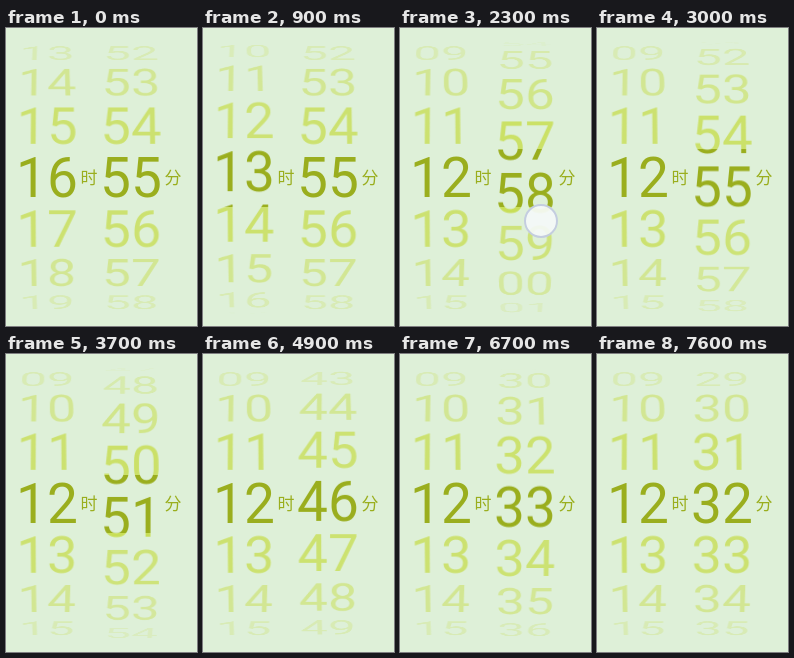
Write an HTML page that moves like this. It is 191 px wide and 298 px high and loops after 8 s.

```html
<!DOCTYPE html>
<html lang="zh-CN">
<head>
<meta charset="utf-8">
<title>时间选择</title>
<style>
  :root { --bg: #def0d8; --ink: #9aae1e; --pale: #c6dd4d; --mid: 150.2px; }
  html, body { margin: 0; width: 100%; height: 100%; overflow: hidden; background: var(--bg); }
  #stage { position: relative; width: 191px; height: 298px; overflow: hidden; background: var(--bg); }
  .wheel { position: absolute; top: 0; width: 68px; height: 298px; }
  .band { position: absolute; left: 0; top: 121px; width: 100%; height: 58px; overflow: hidden; background: var(--bg); }
  .layer { position: absolute; left: 0; top: 0; width: 100%; height: 298px; color: var(--pale); }
  .band .layer { top: -121px; color: var(--ink); }
  .item {
    position: absolute; left: 0; top: calc(var(--mid) - 32px); width: 100%; height: 64px;
    font: 400 55px/64px Roboto, sans-serif; text-align: center; white-space: nowrap;
  }
  .unit {
    position: absolute; top: 136.5px; width: 24px; height: 24px; color: var(--ink);
    font: 400 17px/24px "Noto Sans CJK SC", "Noto Sans CJK", sans-serif; text-align: center;
  }
  #touch {
    position: absolute; left: -17px; top: -17px; width: 34px; height: 34px; box-sizing: border-box;
    border: 2px solid rgba(184, 194, 218, .8); border-radius: 50%; background: rgba(246, 249, 250, .9);
  }
</style>
</head>
<body>
<div id="stage">
  <div class="unit" style="left:71px">时</div>
  <div class="unit" style="left:155px">分</div>
  <div id="touch"></div>
</div>
<script>
const LOOP = 8000, STEP = 100;
const RADIUS = 135, DEPTH = 675, ANGLE = Math.PI / 8, REACH = 4;
const stage = document.getElementById('stage');
const touch = document.getElementById('touch');

const lin = u => u;
const out = u => 1 - (1 - u) * (1 - u);

// [time, value, easing towards it]
const hourKeys = [
  [500, 16], [800, 13.4, lin], [1400, 12.45, out], [1600, 12, out]
];
const minuteKeys = [
  [1400, 55], [1700, 57.3, lin], [1900, 58, out],
  [2200, 58, lin], [2300, 57.7, lin], [2500, 56.2, lin], [3200, 54.7, out],
  [3400, 51.45, lin], [4000, 50.5, out], [4200, 50, out],
  [4600, 50, lin], [4900, 46.04, lin], [7200, 32.28, out],
  [7300, 32.28, lin], [7600, 32, out]
];
// [start, end, x, first y, last y]
const touches = [
  [600, 800, 40, 130, 215], [1400, 1700, 129, 240, 130],
  [2300, 2500, 141, 193, 272], [3200, 3400, 144, 110, 260],
  [4700, 4900, 137, 110, 260]
];

function valueAt(keys, t) {
  const i = keys.findIndex(k => k[0] > t);
  if (i === 0) return keys[0][1];
  if (i < 0) return keys[keys.length - 1][1];
  const [t0, a] = keys[i - 1], [t1, b, ease] = keys[i];
  return a + (b - a) * ease((t - t0) / (t1 - t0));
}

function add(parent, name) {
  const el = document.createElement('div');
  el.className = name;
  return parent.appendChild(el);
}

function makeWheel(left, count, keys) {
  const wheel = document.createElement('div');
  wheel.className = 'wheel';
  wheel.style.left = left + 'px';
  stage.insertBefore(wheel, stage.firstChild);
  const fill = layer => Array.from({ length: 2 * REACH + 1 }, () => add(layer, 'item'));
  const pale = fill(add(wheel, 'layer'));
  const dark = fill(add(add(wheel, 'band'), 'layer'));

  return t => {
    const pos = valueAt(keys, t), base = Math.round(pos);
    pale.forEach((el, i) => {
      const n = base + i - REACH, d = n - pos, a = d * ANGLE;
      const shown = Math.abs(d) < REACH;
      const text = String((n + count) % count).padStart(2, '0');
      const y = RADIUS * Math.sin(a), z = RADIUS * (Math.cos(a) - 1);
      el.style.opacity = Math.max(0, 1 - Math.abs(d) / REACH);
      for (const item of [el, dark[i]]) {
        item.textContent = text;
        item.style.visibility = shown ? 'visible' : 'hidden';
        item.style.transform =
          `translateY(${y}px) perspective(${DEPTH}px) translateZ(${z}px) rotateX(${-a}rad)`;
      }
    });
  };
}

const wheels = [makeWheel(7.3, 24, hourKeys), makeWheel(91.3, 60, minuteKeys)];

function drawTouch(t) {
  const hit = touches.find(p => t >= p[0] && t < p[1]);
  touch.style.display = hit ? 'block' : 'none';
  if (!hit) return;
  const [t0, t1, x, y0, y1] = hit;
  const y = y0 + (y1 - y0) * (t - t0) / (t1 - t0);
  touch.style.transform = `translate(${x}px, ${y}px)`;
}

let last = -1;
function frame() {
  const t = Math.floor(performance.now() % LOOP / STEP) * STEP;
  if (t !== last) {
    last = t;
    wheels.forEach(draw => draw(t));
    drawTouch(t);
  }
  requestAnimationFrame(frame);
}
frame();
</script>
</body>
</html>
```
